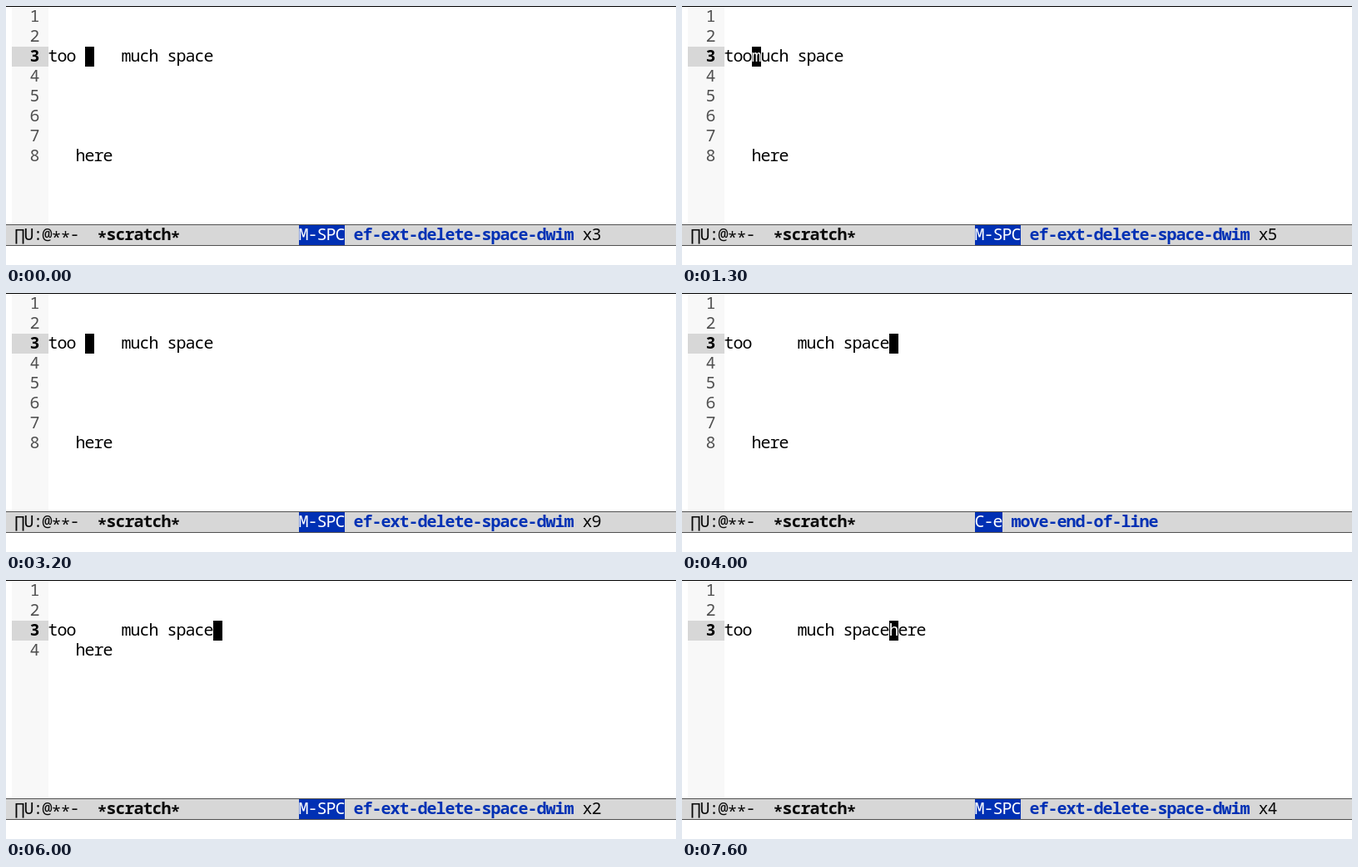
Recreate the animation shown at these times as an HTML page with a canvas. Size 805 by 312 pixels, loop 8 s.

```html
<!DOCTYPE html>
<html lang="en">
<head>
<meta charset="utf-8">
<title>Deleting space in an editor</title>
<style>
  html, body { margin: 0; height: 100%; overflow: hidden; background: #fff; }
  canvas { display: block; }
</style>
</head>
<body>
<canvas id="stage" width="805" height="312"></canvas>
<script>
const ctx = document.getElementById("stage").getContext("2d");
const LOOP = 8000, CELL = 11, LINE = 24, BASELINE = 18;
const TEXT_X = 51, CURSOR_ROW = 2, MODELINE_Y = 264;
const GREY = "#d7d7d7", BLUE = "#0030b4";

const wide = "too     much space";
const tall = "\n\n\n\n\n   here";
const delCommand = count => ["M-SPC", "ef-ext-delete-space-dwim", count];
const moveCommand = ["C-e", "move-end-of-line", ""];

// Start time, text from line 3 onwards, cursor column, last command
const steps = [
  [0, wide + tall, 4, delCommand("x3")],
  [700, "too much space" + tall, 4, delCommand("x4")],
  [1300, "toomuch space" + tall, 3, delCommand("x5")],
  [1700, wide + tall, 4, delCommand("x6")],
  [2300, "too much space" + tall, 4, delCommand("x7")],
  [2800, "toomuch space" + tall, 3, delCommand("x8")],
  [3200, wide + tall, 4, delCommand("x9")],
  [4000, wide + tall, 18, moveCommand],
  [5000, wide + "\n\n   here", 18, delCommand("")],
  [6000, wide + "\n   here", 18, delCommand("x2")],
  [6700, wide + " here", 18, delCommand("x3")],
  [7600, wide + "here", 18, delCommand("x4")],
];

function rect(x, y, w, h, color) {
  ctx.fillStyle = color;
  ctx.fillRect(x, y, w, h);
}

// Draws text on the character grid and returns the x after it
function write(text, x, top, color = "#000", weight = 400) {
  ctx.font = `${weight} 20px "Noto Sans Mono", monospace`;
  ctx.textAlign = "center";
  ctx.fillStyle = color;
  [...text].forEach((char, i) => {
    const drop = char === "*" ? 4 : 0; // asterisks sit mid-line
    ctx.fillText(char, x + (i + 0.5) * CELL, top + BASELINE + drop);
  });
  return x + text.length * CELL;
}

function drawBuffer(text, column) {
  const lines = ["", "", ...text.split("\n")];
  rect(7, 1, 44, 262, "#f8f8f8");
  lines.forEach((line, row) => {
    const top = 1 + row * LINE;
    const current = row === CURSOR_ROW;
    if (current) rect(7, top, 44, LINE, GREY);
    write(String(row + 1), 29, top, current ? "#000" : "#505050", current ? 700 : 400);
    write(line, TEXT_X, top);
    if (current) {
      const x = TEXT_X + column * CELL;
      rect(x, top, CELL, LINE, "#000");
      write(line[column] || "", x, top, "#fff");
    }
  });
}

function drawModeline([key, command, count]) {
  rect(0, MODELINE_Y - 1, 805, 26, "#505050");
  rect(0, MODELINE_Y, 805, LINE, GREY);
  write("∏U:@**-", 11, MODELINE_Y, "#0a0a0a");
  write("*scratch*", 110, MODELINE_Y, "#0a0a0a", 700);
  rect(352, MODELINE_Y, key.length * CELL, LINE, BLUE);
  let x = write(key, 352, MODELINE_Y, "#fff") + CELL;
  x = write(command, x, MODELINE_Y, BLUE, 700) + CELL;
  write(count, x, MODELINE_Y, "#0a0a0a");
}

function draw() {
  const time = performance.now() % LOOP;
  const [, text, column, command] = steps.findLast(([start]) => start <= time);
  rect(0, 0, 805, 312, "#fff");
  rect(0, 0, 805, 1, "#000");
  drawBuffer(text, column);
  drawModeline(command);
  requestAnimationFrame(draw);
}
draw();
</script>
</body>
</html>
```
